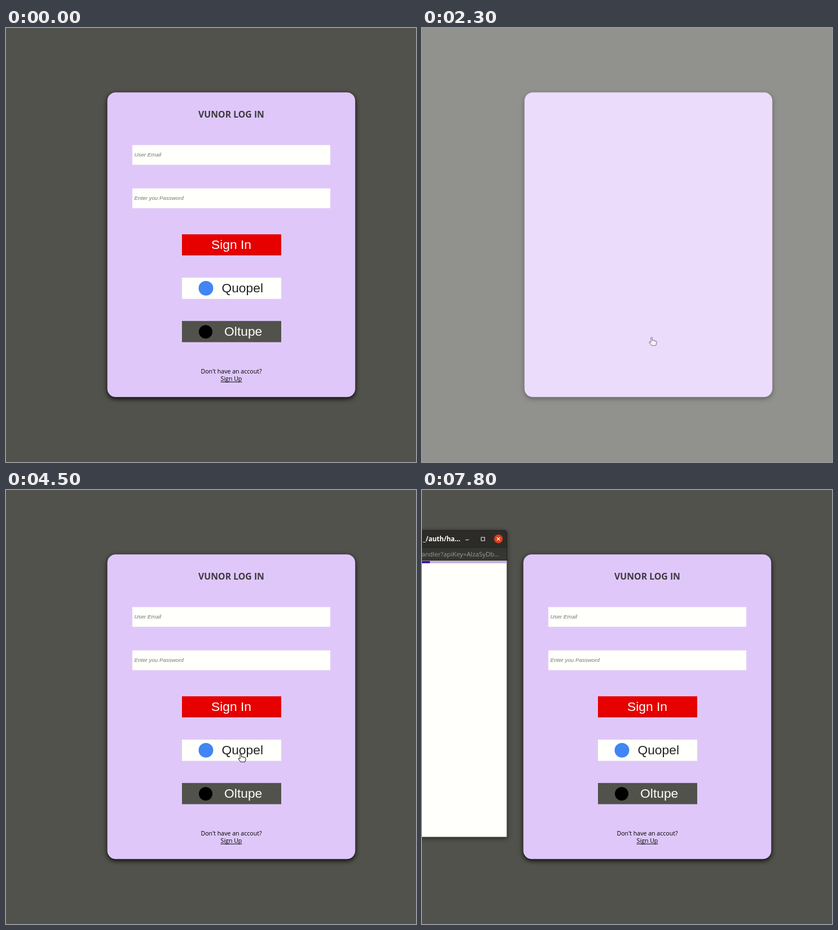
Write an HTML page that moves like this. It is 727x770 px and loops after 8 s.

```html
<!DOCTYPE html>
<html lang="en">
<head>
<meta charset="utf-8">
<title>Log in</title>
<style>
  html, body { margin: 0; width: 100%; height: 100%; overflow: hidden; background: #fff; }
  svg { display: block; width: 727px; height: 770px; }

  .ui { font-family: "Open Sans", "Noto Sans", sans-serif; }
  .form { font-family: "Liberation Sans", Arial, sans-serif; }
  .mid { text-anchor: middle; }
  .end { text-anchor: end; }
  .title { font-size: 15.8px; font-weight: 700; fill: #3d3a40; }
  .hint { font-size: 9.77px; font-style: italic; fill: #757575; }
  .label { font-size: 22.8px; }
  .small { font-size: 10.6px; }
  .tab { font-size: 11.6px; font-weight: 700; fill: #fff; }
  .address { font-size: 11.3px; fill: #9b9b96; }
  .panel { filter: drop-shadow(0 3px 4.5px rgba(0, 0, 0, .9)); }
  .window { filter: drop-shadow(0 2px 4px rgba(0, 0, 0, .5)); }

  /* Everything shares one 8 s timeline: 1% = 80 ms. */
  .play { animation: 8s linear infinite; }
  .hard { animation: 8s step-end infinite; }

  #page { animation-name: page; }
  @keyframes page {
    0%, 16.24% { opacity: 1; }
    16.25%, 22.5% { opacity: .333; }
    28.75%, 29.9% { opacity: .632; }
    33.75% { opacity: .87; }
    41.25%, 42.4% { opacity: .96; }
    46%, 100% { opacity: 1; }
  }
  #card { animation-name: card; }
  @keyframes card {
    0%, 16.24% { opacity: 1; translate: 0; }
    16.25%, 22.5% { opacity: 0; translate: 2px; }
    26%, 33.75% { opacity: 1; translate: 2px; }
    37.5%, 100% { opacity: 1; translate: 0; }
  }

  /* Form rows spring up one group after another. */
  #email { animation-name: email; }
  @keyframes email {
    0%, 16.24% { opacity: 1; translate: 0; }
    16.25%, 36% { opacity: 0; translate: 0 100px; }
    37% { opacity: 1; translate: 0 45px; }
    39.5% { translate: 0 -9px; }
    41.25%, 42.4% { translate: 0 -1.7px; }
    44%, 100% { opacity: 1; translate: 0; }
  }
  #password { animation-name: password; }
  @keyframes password {
    0%, 16.24% { opacity: 1; translate: 0; }
    16.25%, 39.5% { opacity: 0; translate: 0 100px; }
    40.5% { opacity: 1; translate: 0 70px; }
    41.25%, 42.4% { translate: 0 42px; }
    44.5% { translate: 0 -8px; }
    46.5%, 100% { opacity: 1; translate: 0; }
  }
  #providers { animation-name: providers; }
  @keyframes providers {
    0%, 16.24% { opacity: 1; translate: 0; }
    16.25%, 43% { opacity: 0; translate: 0 100px; }
    44.2% { opacity: 1; translate: 0 42px; }
    46.5% { translate: 0 -8px; }
    48.5%, 100% { opacity: 1; translate: 0; }
  }
  .late { animation-name: late; }
  @keyframes late {
    0%, 16.24% { opacity: 1; }
    16.25%, 46.5% { opacity: 0; }
    50%, 100% { opacity: 1; }
  }
  #underline { animation-name: underline; }
  @keyframes underline {
    0%, 56.25%, 100% { opacity: 1; }
    53.75% { opacity: 0; }
  }

  /* Sign-in window */
  #popup { animation-name: popup; }
  @keyframes popup {
    0% { opacity: 0; }
    70% { opacity: .4; }
    71.25% { opacity: .8; }
    72.5%, 100% { opacity: 1; }
  }
  #first { animation-name: first; }
  @keyframes first {
    0%, 82.5%, 100% { opacity: 0; }
    77.5% { opacity: 1; }
  }
  #second { animation-name: second; }
  @keyframes second { 0% { opacity: 0; } 82.5%, 100% { opacity: 1; } }
  #address { animation-name: address; }
  @keyframes address { 0% { opacity: 0; } 77.5%, 100% { opacity: 1; } }
  #blank { animation-name: blank; }
  @keyframes blank { 0% { opacity: 0; } 88.75%, 100% { opacity: 1; } }
  #bar { animation-name: bar; }
  @keyframes bar { 0% { opacity: 0; } 92.5%, 100% { opacity: 1; } }
  #done { animation-name: done; }
  @keyframes done { 0% { width: 0; } 97.5%, 100% { width: 14px; } }

  /* Pointer */
  #arrow { animation-name: arrow; }
  @keyframes arrow {
    0%, 42.49% { opacity: 0; translate: 57px 42px; }
    42.5% { opacity: 1; translate: 57px 42px; }
    43.75%, 44.9% { opacity: 1; translate: 57px 66px; }
    51% { translate: 300px 698px; }
    53.74% { opacity: 1; translate: 398px 622px; }
    53.75%, 77.49% { opacity: 0; translate: 134px 131px; }
    77.5%, 78.7% { opacity: 1; translate: 134px 131px; }
    80%, 82.5% { opacity: 1; translate: 128px 106px; }
    85%, 88.7% { opacity: 1; translate: 120px 38px; }
    88.75%, 100% { opacity: 0; translate: 120px 15px; }
  }
  #hand { animation-name: hand; }
  @keyframes hand {
    0%, 77.5%, 100% { opacity: 0; translate: 411px 467px; }
    53.75% { opacity: 1; translate: 394px 618px; }
    55% { opacity: 1; translate: 411px 467px; }
  }
</style>
</head>
<body>
<svg viewBox="0 0 727 770">
  <g id="page" class="play">
    <rect width="727" height="770" fill="#51524b"/>
    <g id="card" class="play">
      <rect class="panel" x="179.7" y="114.2" width="439.5" height="540.6" rx="15" fill="#dfc8f9"/>
      <text class="ui title mid late play" x="399.5" y="159.3">VUNOR LOG IN</text>

      <g id="email" class="form play">
        <rect x="224" y="207.7" width="351" height="35" fill="#fffffb"/>
        <text class="hint" x="227.5" y="228">User Email</text>
      </g>

      <g id="password" class="form play">
        <rect x="224" y="284.6" width="351" height="35" fill="#fffffb"/>
        <text class="hint" x="227.5" y="305">Enter you Password</text>
        <rect x="312" y="366" width="176" height="37.2" fill="#e60000"/>
        <rect x="312" y="402" width="176" height="1.2" fill="#b80008"/>
        <text class="label mid" x="399.5" y="391.7" fill="#fffffb">Sign In</text>
      </g>

      <g id="providers" class="form play">
        <rect x="312" y="443" width="176" height="37.6" fill="#fffffb"/>
        <circle cx="354.5" cy="461.7" r="13" fill="#4285f4"/>
        <text class="label mid" x="419.2" y="469.4" fill="#222">Quopel</text>
        <rect x="312" y="519.8" width="176" height="37.6" fill="#51524b"/>
        <circle cx="354" cy="539" r="12" fill="#000"/>
        <text class="label mid" x="420.7" y="546.3" fill="#fffffb">Oltupe</text>
      </g>

      <g class="ui small mid late play">
        <text x="399.5" y="613">Don't have an accout?</text>
        <text x="399.5" y="626.3">Sign Up</text>
        <rect id="underline" class="hard" x="380.5" y="627.5" width="38" height="1"/>
      </g>
    </g>
  </g>

  <g id="popup" class="ui hard">
    <path class="window" d="M-20 71H145Q151 71 151 77V616H-20Z" fill="#22221f"/>
    <path d="M-20 72H144.5Q150 72 150 77.5V101.5H-20Z" fill="#2c2b28"/>
    <rect x="-20" y="102.5" width="170" height="22" fill="#353631"/>
    <rect x="-20" y="125.5" width="170.3" height="490" fill="#32332e"/>
    <text id="first" class="tab end hard" x="20.5" y="91.3">ome</text>
    <text id="second" class="tab end hard" x="68" y="91.3">_/auth/ha…</text>
    <text id="address" class="address end hard" x="137" y="117.7">andler?apiKey=AIzaSyDb…</text>
    <path d="M77 88.5H83M105 84H111V90H105Z" fill="none" stroke="#eee" stroke-width="1.1"/>
    <circle cx="135.5" cy="86.8" r="7.7" fill="#d9401a"/>
    <path d="M132.7 84L138.3 89.6M138.3 84L132.7 89.6" stroke="#fff" stroke-width="1.2"/>
    <rect id="blank" class="hard" x="-20" y="125.5" width="170.3" height="490" fill="#fffffb"/>
    <g id="bar" class="hard">
      <rect y="126" width="150.3" height="4" fill="#c6b2e4"/>
      <rect id="done" class="hard" y="126" height="4" fill="#4a0fa8"/>
    </g>
  </g>

  <path id="arrow" class="play" d="M1 1V14L4 11.2L6 15.8L8.2 14.8L6.2 10.4H10.2Z"
        fill="#222" stroke="#fff" stroke-width="1.1"/>
  <path id="hand" class="play" d="M4 9V2Q5.2 0 6.4 2V6.5Q8 5.4 9 7Q10.6 6 11.6 7.6Q13.6 7 14 9V12L12.5 15.5H5.5L1 10.5Q1.5 8 4 9.8Z"
        fill="#fffffb" stroke="#222" stroke-width="1.1" stroke-linejoin="round"/>
</svg>
</body>
</html>
```
